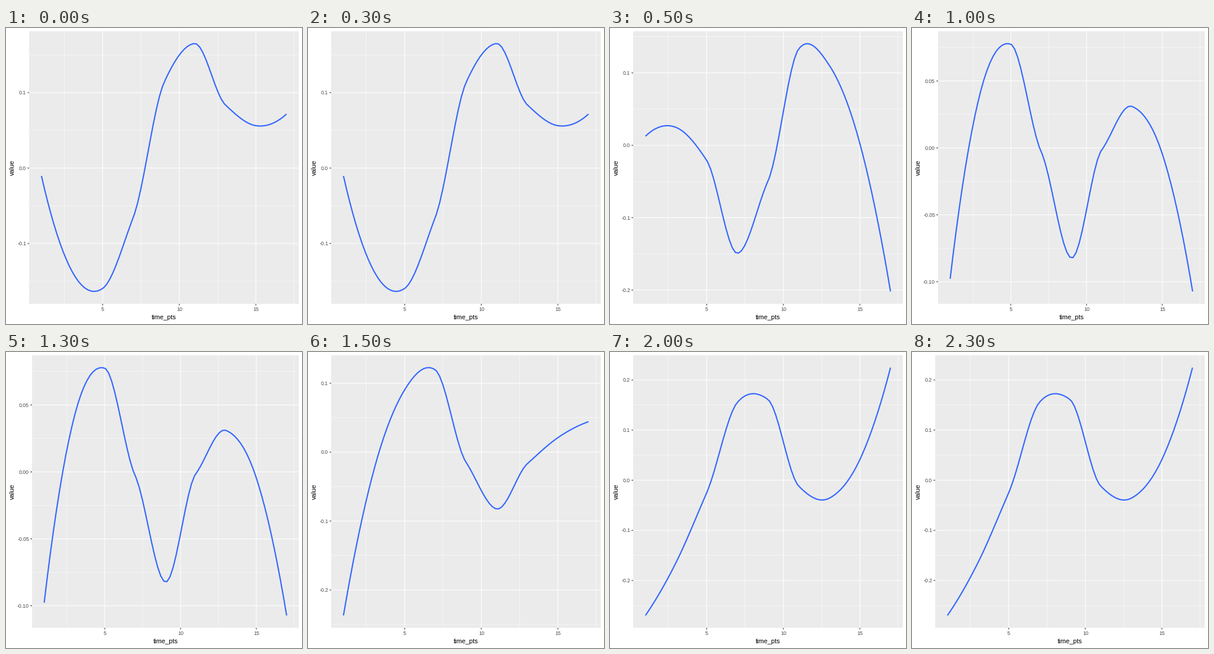
Animation, 500 px wide and 500 px high, one loop 2.5 s. Source, as a matplotlib script:

```python
import numpy as np
import matplotlib.pyplot as plt
from matplotlib.animation import ArtistAnimation
from matplotlib.patches import Rectangle

SIZE, DPI = 500, 100
PT = 72 / DPI  # points per pixel
TOP, RIGHT, BOTTOM = 5.5, 494.5, 465.9
TICK = 2.75
PAD = 0.05  # free margin around the data, as a share of its range

# curve heights at times 1, 3, ... 17, in thousandths
CURVES = [
    [-10.5, -137, -159.5, -65, 113, 165, 83.8, 56.1, 71.5],
    [12.5, 24.7, -20.9, -149.3, -49.5, 133, 110.6, 2.5, -201.9],
    [-97.7, 41.8, 77.5, -2.7, -82.3, -1.5, 31, -4.5, -107.2],
    [-237, -25, 90.6, 119.4, -14.6, -82.5, -16.9, 21, 44.2],
    [-269.7, -164, -25, 155.2, 161, -11.5, -36, 41.1, 224.5],
]


def local_fits(n, reach=6):
    """Matrices giving height and slope of a tricube-weighted parabola at each knot."""
    height, slope = np.empty((2, n, n))
    for i in range(n):
        d = np.arange(n) - i
        width = np.sort(abs(d))[reach - 1]
        weight = (1 - np.minimum(abs(d) / width, 1) ** 3) ** 3
        basis = np.vander(d, 3, increasing=True)
        fit = np.linalg.solve(basis.T * weight @ basis, basis.T * weight)
        height[i], slope[i] = fit[:2]
    return height, slope


def knot_slopes(ys):
    """Slopes of a local regression with these heights; plain parabolas at the ends."""
    height, slope = local_fits(len(ys))
    samples = np.linalg.lstsq(height, ys, rcond=0.1)[0]
    ms = np.gradient(ys, edge_order=2)
    ms[2:-2] = (slope @ samples)[2:-2]
    return ms


def smooth(u, ys):
    """Cubic curve through the knots, u counted in knots."""
    ms = knot_slopes(ys)
    i = np.minimum(u.astype(int), len(ys) - 2)
    t = u - i
    return ((1 + 2 * t) * (1 - t) ** 2 * ys[i] + t * (1 - t) ** 2 * ms[i]
            + t * t * (3 - 2 * t) * ys[i + 1] + t * t * (t - 1) * ms[i + 1])


fig = plt.figure(figsize=(SIZE / DPI, SIZE / DPI), dpi=DPI, facecolor="white")
ax = fig.add_axes([0, 0, 1, 1])
ax.set_xlim(0, SIZE)
ax.set_ylim(SIZE, 0)
ax.axis("off")


def line(xs, ys, color, width):
    return ax.plot(xs, ys, color=color, lw=width * PT, snap=False,
                   solid_capstyle="butt", solid_joinstyle="round")[0]


def label(x, y, text, size, color, **kw):
    kw = {"ha": "center", "va": "baseline", **kw}
    return ax.text(x, y, text, size=size * PT, color=color,
                   family="Liberation Sans", rotation_mode="anchor", **kw)


def scale(values, start, end):
    """Linear map of the values' padded range onto start..end."""
    lo, hi = np.min(values), np.max(values)
    pad = PAD * (hi - lo)
    return lambda v: start + (v - lo + pad) / (hi - lo + 2 * pad) * (end - start)


def draw_plot(heights):
    x = np.linspace(1, 17, 80)
    y = smooth((x - 1) / 2, np.array(heights) / 1000)
    step, decimals = (0.1, 1) if np.ptp(y) > 0.25 else (0.05, 2)
    left = 34.4 + 4.8 * decimals
    to_x = scale(x, left, RIGHT)
    to_y = scale(y, BOTTOM, TOP)

    panel = Rectangle((left, TOP), RIGHT - left, BOTTOM - TOP,
                      fc="#EBEBEB", lw=0, snap=False)
    parts = [ax.add_patch(panel)]

    def breaks(first):
        return [v for v in step * np.arange(first, 5) if TOP < to_y(v) < BOTTOM]

    majors = breaks(-4)
    for width, x_breaks, y_breaks in ((0.53, (2.5, 7.5, 12.5, 17.5), breaks(-4.5)),
                                      (1.07, (5, 10, 15), majors)):
        for v in y_breaks:
            parts.append(line([left, RIGHT], [to_y(v)] * 2, "white", width))
        for v in x_breaks:
            parts.append(line([to_x(v)] * 2, [TOP, BOTTOM], "white", width))

    parts.append(line(to_x(x), to_y(y), "#3366FF", 2.13))

    for v in majors:
        py = to_y(v)
        parts.append(line([left - TICK, left], [py, py], "#333333", 1.07))
        parts.append(label(left - 4.95, py + 3.2, f"{v:.{decimals}f}",
                           8.8, "#4D4D4D", ha="right"))
    for v in (5, 10, 15):
        px = to_x(v)
        parts.append(line([px, px], [BOTTOM, BOTTOM + TICK], "#333333", 1.07))
        parts.append(label(px, 478.2, str(v), 8.8, "#4D4D4D"))

    parts.append(label((left + RIGHT) / 2, 492, "time_pts", 11, "black"))
    parts.append(label(13.5, (TOP + BOTTOM) / 2, "value", 11, "black", rotation=90))
    return parts


anim = ArtistAnimation(fig, [draw_plot(c) for c in CURVES],
                       interval=500, repeat=True, repeat_delay=0)
plt.show()
```
